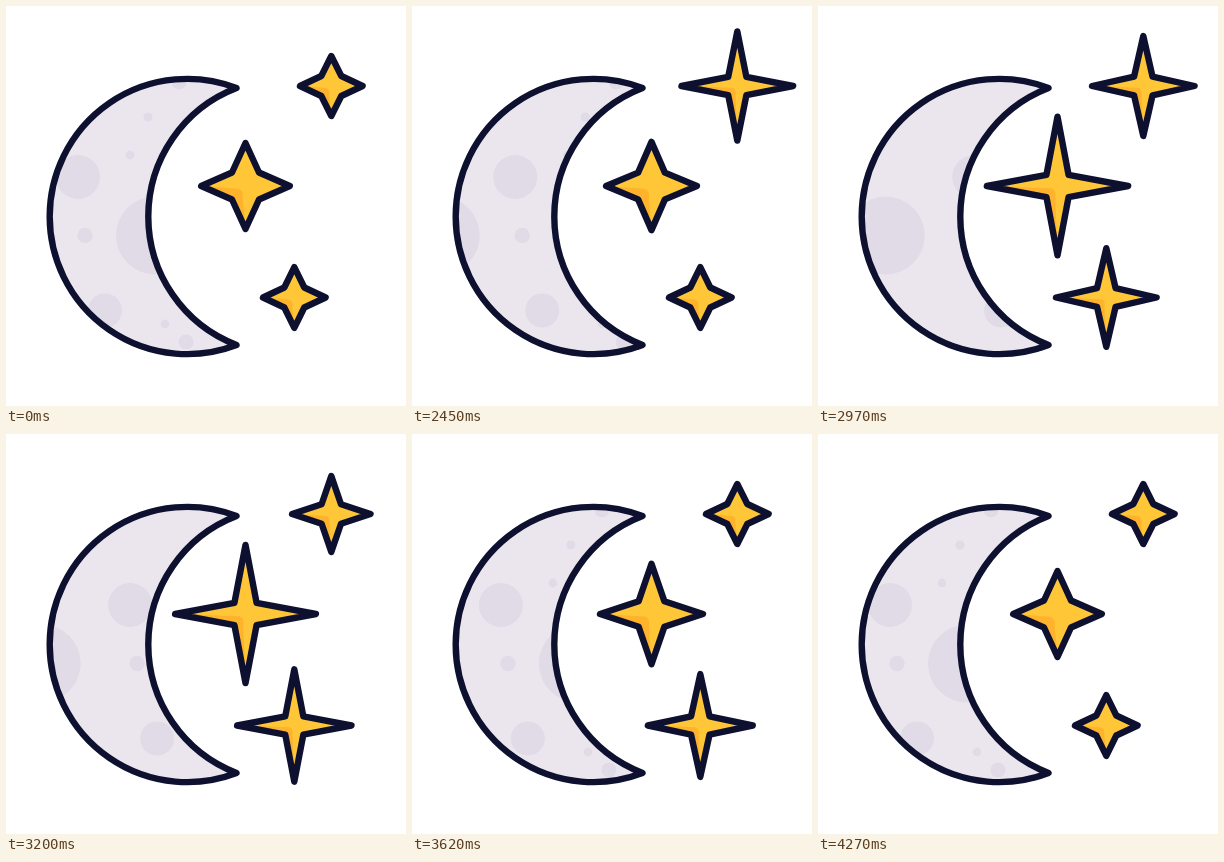
Write an HTML page that moves like this. It is 400x400 px and loops after 4300 ms.

```html
<!DOCTYPE html>
<html lang="en">
<head>
<meta charset="utf-8">
<title>Moon and stars</title>
<style>
  html, body { margin: 0; width: 100%; height: 100%; overflow: hidden; background: #fff; }
  svg { display: block; width: 100%; height: 100%; }
  .outline { fill: none; stroke: #0e1030; stroke-width: 6.4; stroke-linejoin: round; }
</style>
</head>
<body>
<svg viewBox="0 0 400 400">
  <defs>
    <path id="crescent" d="M230.5 82A137.6 137.6 0 1 0 230.5 339A137.7 137.7 0 0 1 230.5 82Z"/>
    <clipPath id="moonClip"><use href="#crescent"/></clipPath>
    <g id="craters" fill="#e1dae7">
      <circle cx="149" cy="229.5" r="39"/>
      <circle cx="72" cy="171" r="22"/>
      <circle cx="99" cy="304.5" r="17"/>
      <circle cx="79" cy="229.5" r="7.7"/>
      <circle cx="180" cy="336" r="7.5"/>
      <circle cx="173" cy="76" r="7.5"/>
      <circle cx="142" cy="111" r="4.6"/>
      <circle cx="124" cy="149" r="4.4"/>
      <circle cx="159" cy="318" r="4.4"/>
    </g>
  </defs>
  <use href="#crescent" fill="#ebe6ee"/>
  <g clip-path="url(#moonClip)">
    <g id="surface">
      <use href="#craters"/>
      <use href="#craters" x="151.5"/>
      <use href="#craters" x="317"/>
    </g>
  </g>
  <use href="#crescent" class="outline"/>
  <g id="stars"></g>
</svg>
<script>
const LOOP = 4300, TRAVEL = 317, GROWTH = 27;
const surface = document.getElementById('surface');
const clamp = x => Math.min(1, Math.max(0, x));

function bezierEase(x1, y1, x2, y2) {
  const at = (a, b, s) => 3 * s * (1 - s) ** 2 * a + 3 * s * s * (1 - s) * b + s ** 3;
  return u => {
    let lo = 0, hi = 1;
    for (let i = 0; i < 24; i++) {
      const mid = (lo + hi) / 2;
      if (at(x1, x2, mid) < u) lo = mid; else hi = mid;
    }
    return at(y1, y2, lo);
  };
}
const spin = bezierEase(.3, .57, .45, .99);
const rise = bezierEase(.25, .1, .25, 1);
const fall = u => (1 + Math.cos(Math.PI * u)) / 2;

// rx, ry: arm lengths; inner: corner offset; shrink: how far corners pull in when stretched
const stars = [
  { x: 325.3, y: 80, rx: 31.3, ry: 30, inner: 10, shrink: 1, start: 2005 },
  { x: 239.5, y: 180, rx: 44.3, ry: 43, inner: 13.5, shrink: 2.5, start: 2410 },
  { x: 288.3, y: 291.5, rx: 31.3, ry: 30.3, inner: 10, shrink: 1, start: 2680 }
];

function addPath(parent, attrs) {
  const path = document.createElementNS('http://www.w3.org/2000/svg', 'path');
  for (const name in attrs) path.setAttribute(name, attrs[name]);
  return parent.appendChild(path);
}

for (const star of stars) {
  const transform = `translate(${star.x} ${star.y})`;
  const layer = document.getElementById('stars');
  star.body = addPath(layer, { transform, fill: '#ffc637' });
  star.shade = addPath(layer, { transform, fill: '#ffb22c' });
  star.edge = addPath(layer, { transform, class: 'outline' });
}

function drawStar(star, time) {
  const age = time - star.start;
  const stretch = age < 700 ? rise(clamp(age / 700)) : fall(clamp((age - 700) / 780));
  const a = star.rx + GROWTH * stretch;
  const b = star.ry + GROWTH * stretch;
  const i = star.inner - star.shrink * stretch;
  const shape = `M0 ${-b}L${i} ${-i}L${a} 0L${i} ${i}L0 ${b}L${-i} ${i}L${-a} 0L${-i} ${-i}Z`;
  star.body.setAttribute('d', shape);
  star.edge.setAttribute('d', shape);
  star.shade.setAttribute('d',
    `M${-a} 0L${-.55 * i} ${.2 * i}Q${-.1 * i} ${.3 * i} ${-.2 * i} ${i}L0 ${b}L${-i} ${i}Z`);
}

function render(now) {
  const time = now % LOOP;
  const shift = TRAVEL * spin(clamp((time - 2005) / 2265));
  surface.setAttribute('transform', `translate(${-shift} 0)`);
  for (const star of stars) drawStar(star, time);
  requestAnimationFrame(render);
}
render(0);
</script>
</body>
</html>
```
